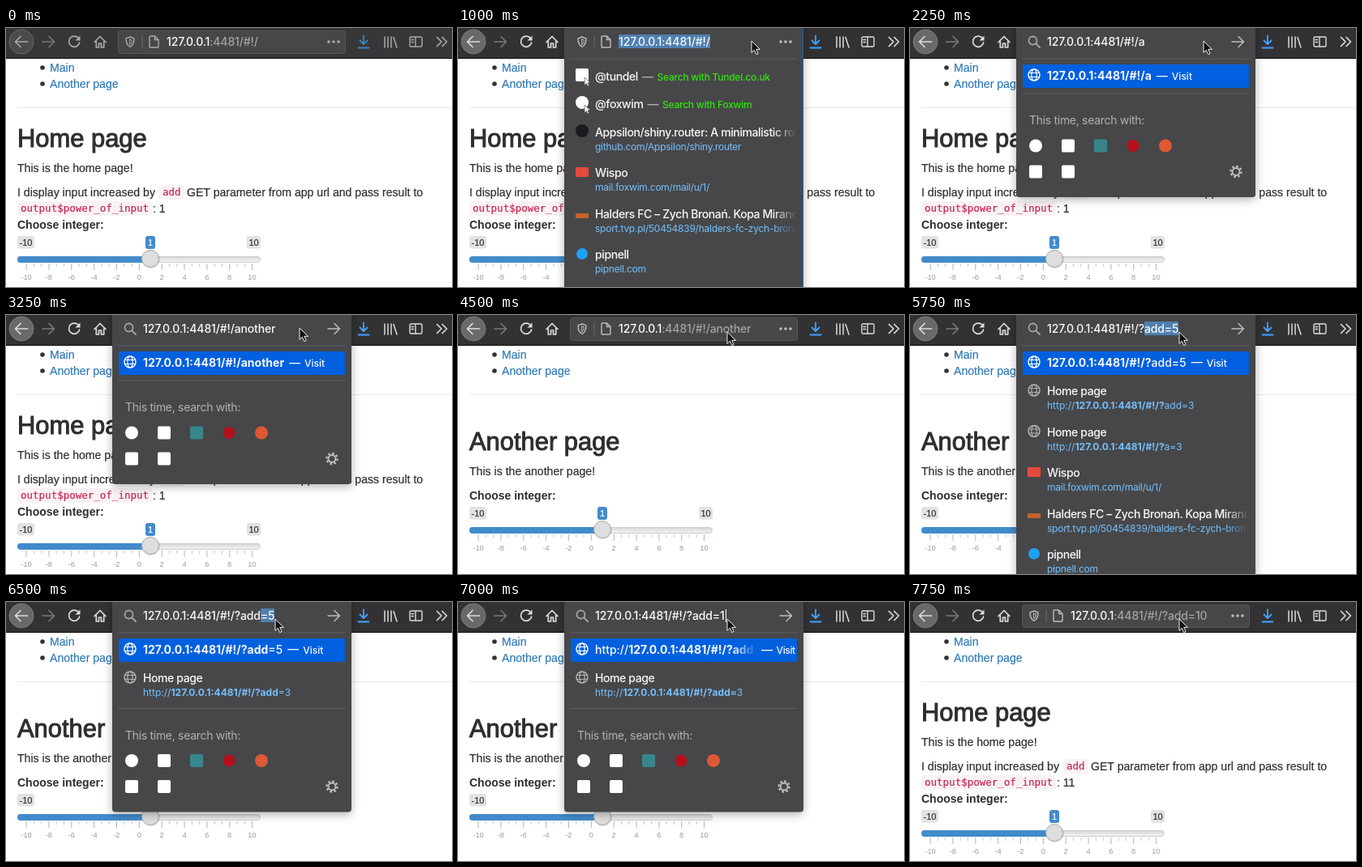
Write an HTML page that moves like this. It is 550 px wide and 320 px high and loops after 8 s.

```html
<!DOCTYPE html>
<html lang="en">
<head>
<meta charset="utf-8">
<title>Router demo</title>
<style>
html, body { margin: 0; width: 100%; height: 100%; overflow: hidden; background: #fff; }
#stage { position: relative; width: 550px; height: 320px; overflow: hidden; }
svg { position: absolute; left: 0; top: 0; }
text { white-space: pre; }
.page text { font: 14.1px "Liberation Sans", Arial, sans-serif; fill: #2e2e2e; stroke: #2e2e2e; stroke-width: .2px; }
.page .head { font-size: 30.9px; stroke-width: 1px; }
.page .bold { font-weight: 700; font-size: 14px; stroke: none; }
.page .link { fill: #2f78b7; stroke: #2f78b7; }
.page .code { font: 12.5px "DejaVu Sans Mono", monospace; fill: #c7254e; stroke: #c7254e; }
.page .tag { font-size: 11px; text-anchor: middle; }
.page .now { fill: #fff; stroke: #fff; }
.page .num { font-size: 9.3px; fill: #919ca5; stroke: none; text-anchor: middle; }
.ui text, #stage .url { font: 500 14px Inter, "Noto Sans", sans-serif; letter-spacing: -.4px; fill: #f9f9fa; color: #f9f9fa; }
.ui .sub { font-size: 12px; font-weight: 400; letter-spacing: -.25px; fill: #74c0ff; }
.ui .act { font-size: 12px; letter-spacing: -.25px; fill: #30e60b; }
.ui .addr { letter-spacing: 0; }
.ui .hit { font-weight: 700; }
.ui .dash { fill: #b1b1b3; }
.ui .visit { font-size: 12px; }
.ui .hint { fill: #b1b1b3; font-weight: 400; letter-spacing: -.3px; }
#stage .url { position: absolute; top: 6.9px; line-height: 20px; white-space: pre; letter-spacing: -.15px; }
.url .dim { color: #a3a3a6; }
.url .sel { background: #4f80b0; }
.url .caret { display: inline-block; width: 1px; height: 16px; margin-left: 1px; background: #fff; vertical-align: -3px; }
</style>
</head>
<body>
<div id="stage"></div>
<script>
const STEP = 250, LOOP = 8000;
const HOST = '127.0.0.1', BASE = HOST + ':4481/#!/';

// Each entry holds from its time on; later entries inherit earlier values.
const script = [
  [0,    { page: 'home', out: 1, path: '', active: false, menu: '', mouse: null, sel: '', caret: false }],
  [250,  { mouse: [455, 120] }],
  [500,  { mouse: [386, 46] }],
  [750,  { mouse: [362, 16], active: true }],
  [1000, { menu: 'top', sel: BASE }],
  [1500, { sel: '' }],
  [2250, { menu: 'visit', path: 'a' }],
  [2500, { path: 'ano' }],
  [2750, { path: 'anot' }],
  [3000, { path: 'anothe' }],
  [3250, { path: 'another' }],
  [3500, { menu: '', page: 'another' }],
  [4000, { mouse: [353, 18] }],
  [4250, { mouse: [339, 21] }],
  [4500, { mouse: [332, 21] }],
  [4750, { menu: 'top', sel: 'another' }],
  [5750, { menu: 'mixed', path: '?add=5', sel: 'add=5' }],
  [6000, { menu: 'two', sel: 'dd=5' }],
  [6250, { menu: 'one', sel: 'd=5' }],
  [6500, { sel: '=5' }],
  [6750, { sel: '5' }],
  [7000, { path: '?add=1', sel: '', caret: true }],
  [7250, { path: '?add=10' }],
  [7500, { menu: '', page: 'home', out: 11, caret: false }]
];

const text = (x, y, s, cls = '') => `<text x="${x}" y="${y}" class="${cls}">${s}</text>`;
const span = (s, cls, dx = 0) => `<tspan class="${cls}" dx="${dx}">${s}</tspan>`;
const rect = (x, y, w, h, fill, r = 0, more = '') =>
  `<rect x="${x}" y="${y}" width="${w}" height="${h}" rx="${r}" fill="${fill}" ${more}/>`;
const disc = (x, y, r, fill, more = '') => `<circle cx="${x}" cy="${y}" r="${r}" fill="${fill}" ${more}/>`;
const line = (d, color, w = 1.5) =>
  `<path d="${d}" fill="none" stroke="${color}" stroke-width="${w}" stroke-linecap="round" stroke-linejoin="round"/>`;

const defs = `<defs>
  <linearGradient id="g1" gradientUnits="userSpaceOnUse" x1="388" x2="418"><stop stop-color="#fff"/><stop offset="1"/></linearGradient>
  <linearGradient id="g2" gradientUnits="userSpaceOnUse" x1="338" x2="369"><stop stop-color="#fff"/><stop offset="1"/></linearGradient>
  <linearGradient id="track" x2="0" y2="1"><stop stop-color="#d6d6d6"/><stop offset="1" stop-color="#f4f4f4"/></linearGradient>
  <mask id="fade" maskUnits="userSpaceOnUse" x="0" y="0" width="418" height="320"><rect width="418" height="320" fill="url(#g1)"/></mask>
  <mask id="cut" maskUnits="userSpaceOnUse" x="0" y="0" width="369" height="320"><rect width="369" height="320" fill="url(#g2)"/></mask>
  <filter id="shadow" x="-20%" y="-20%" width="140%" height="140%"><feDropShadow dx="0" dy="3" stdDeviation="6" flood-opacity=".3"/></filter>
</defs>`;

function slider(dy) {
  let s = rect(14, 257, 21, 15.5, '#e2e2e2', 3) + text(24.5, 268.5, '-10', 'tag')
    + rect(297, 257, 17, 15.5, '#e2e2e2', 3) + text(305.5, 268.5, '10', 'tag')
    + rect(172, 257, 12, 16, '#428bca', 3) + text(178, 269, '1', 'tag now')
    + rect(14.5, 282.5, 299, 7, 'url(#track)', 3.5, 'stroke="#ccc"')
    + rect(14, 282, 164, 8, '#428bca', 4);
  for (let i = 0; i <= 30; i++) {
    const big = i % 3 === 0;
    s += rect(24.6 + i * 9.283, 291, 1, big ? 8 : 4, big ? '#a3b9cd' : '#bccbd9');
  }
  for (let i = 0; i <= 10; i++) s += text((25 + i * 27.85).toFixed(1), 311, i * 2 - 10, 'num');
  s += disc(178.7, 286, 11, 'rgba(0,0,0,.12)') + disc(178, 285, 10.5, '#dedede', 'stroke="#ababab"');
  return `<g transform="translate(0 ${dy})">${s}</g>`;
}

function page({ page, out }) {
  let s = disc(45, 49, 2.8, '#333') + disc(45, 69, 2.8, '#333')
    + text(54, 53.5, 'Main', 'link') + text(54, 73.5, 'Another page', 'link')
    + rect(14, 98, 536, 1, '#e9e9e9');
  if (page === 'home') {
    s += text(14, 147, 'Home page', 'head') + text(14, 177.5, 'This is the home page!')
      + text(14, 207.5, 'I display input increased by')
      + rect(189, 194, 31, 18, '#f9f2f4', 4) + text(193, 207, 'add', 'code')
      + text(223, 207.5, 'GET parameter from app url and pass result to')
      + rect(14, 214, 166, 18, '#f9f2f4', 4) + text(18, 227, 'output$power_of_input', 'code')
      + text(181, 227.5, ': ' + out) + text(14, 247.5, 'Choose integer:', 'bold') + slider(0);
  } else {
    s += text(14, 167, 'Another page', 'head') + text(14, 197.5, 'This is the another page!')
      + text(14, 227.5, 'Choose integer:', 'bold') + slider(-20);
  }
  return `<g class="page">${s}</g>`;
}

const dots = c => [398, 404, 410].map(x => disc(x, 17, 1.8, c)).join('');

function siteIcons(c) {
  return line('M153 11l5 1.800c0 5.500-1.300 8.700-5 10.700c-3.700-2-5-5.200-5-10.700z', c, 1.4)
    + line('M153 14l2.300 .8c0 2.700-.7 4.500-2.300 5.700z', c, 1)
    + rect(167.5, 9, 1, 16, '#6a6a6d')
    + line('M177 11q0-1 1-1h5.500l4.500 4.500v8.500q0 1-1 1h-9q-1 0-1-1zM183.500 10v4.500h4.500', c, 1.4)
    + dots(c);
}

function toolbar(active) {
  const c = active ? '#dcdcde' : '#a9a9ac';
  return rect(0, 0, 550, 38, active ? '#323234' : '#373739') + rect(0, 37, 550, 1, '#0c0c0d')
    + disc(19, 17, 15, active ? '#69696c' : '#4b4b4e', `stroke="${active ? '#7c7c7f' : '#6a6a6d'}"`)
    + line('M26.500 17H12M18 10.500l-6.500 6.500 6.500 6.500', c, 1.7)
    + line('M45 17h14.500M53 10.500l6.500 6.500-6.500 6.500', '#79797c', 1.7)
    + line('M89.800 13.300A6.600 6.600 0 1 0 90.600 18', c, 1.7) + `<path d="M91.500 9.500v6h-6z" fill="${c}"/>`
    + line('M109 17.500L116 10.500l7 7M111.300 16.500v7.500h3.200v-5h3v5h3.200v-7.500', c, 1.7)
    + rect(138.5, 3.5, 280, 28, '#474749', 3, 'stroke="#56565a"')
    + siteIcons(active ? '#bdbdc0' : '#a9a9ac')
    + line('M441 9.500v10M436.500 15.500l4.500 4.500 4.500-4.500M434.500 24.500h13', active ? '#45a1ff' : '#3f83bd', 1.8)
    + line('M467 11v13M471 11v13M475 11v13M478 11.500l4 12.500', c)
    + line('M499.500 11h12q1.500 0 1.500 1.500v9q0 1.500-1.500 1.500h-12q-1.500 0-1.500-1.500v-9q0-1.500 1.500-1.500zM505 11v12M500 14.500h2.500M500 17.500h2.500', c, 1.4)
    + line('M531.500 11.500l5.500 5.500-5.500 5.500M538 11.500l5.500 5.500-5.500 5.500', c, 1.7);
}

const globe = (y, c) => disc(153, y, 7, 'none', `stroke="${c}" stroke-width="1.500"`)
  + `<ellipse cx="153" cy="${y}" rx="3.200" ry="7" fill="none" stroke="${c}" stroke-width="1.200"/>`
  + line(`M146.500 ${y - 2.5}h13M146.500 ${y + 2.5}h13`, c, 1.2);
const square = (x, y, c) => rect(x - 8, y - 8, 16, 16, c, 2);

// Two-line result; y is the baseline of its title.
const result = (y, icon, title, url, cls = 'sub') =>
  icon + `<g mask="url(#fade)">${text(169, y, title)}${text(169, y + 17.3, url, cls)}</g>`;

const alias = (y, icon, name, engine) => icon
  + `<path d="M156 ${y + 1}l7 6.500-3 .4 1.700 3.200-1.800.9-1.600-3.200-2.300 2z" fill="#eee" stroke="#474749" stroke-width=".6"/>`
  + text(169, y + 5, name + span('—', 'dash', 5) + span('Search with ' + engine, 'act', 5));

const sites = y =>
  result(y, rect(145, y - 12, 16, 12, '#e5493c'), 'Wispo', 'mail.foxwim.com/mail/u/1/')
  + result(y + 50.5, rect(145, y + 45, 16, 6, '#c2622d'), 'Halders FC – Zych Bronań. Kopa Mirandy', 'sport.tvp.pl/50454839/halders-fc-zych-bronan')
  + result(y + 101, disc(153, y + 95, 7, '#1da1f2'), 'pipnell', 'pipnell.com');

const history = (y, typed, rest) =>
  result(y, globe(y - 6, '#b1b1b3'), 'Home page', 'http://' + span(BASE + typed, 'hit') + rest, 'sub addr');

const typedPart = ({ path, sel }) => path.slice(0, path.length - sel.length);

function visit(s) {
  const typed = BASE + typedPart(s);
  const tail = span('Visit', 'visit', 5);
  const row = rect(139, 45, 279, 29, '#0060df', 2) + globe(58, '#fff');
  if (s.path.startsWith('?') && !s.sel)
    return row + `<g mask="url(#cut)">${text(169, 64, 'http://' + span(typed, 'hit'), 'addr')}</g>` + text(374, 64, '—' + tail);
  return row + text(169, 64, span(typed, 'hit') + s.sel + span('—', '', 6) + tail, 'addr');
}

function engines(dy) {
  const gear = disc(402, 177.5, 4.5, 'none', 'stroke="#c4c4c6" stroke-width="1.800"')
    + disc(402, 177.5, 6.6, 'none', 'stroke="#c4c4c6" stroke-width="2.200" stroke-dasharray="2.600 2.584"');
  return `<g transform="translate(0 ${dy})">` + rect(138, 80.5, 281, 1, '#5e5e61')
    + text(147, 119, 'This time, search with:', 'hint')
    + disc(155, 145.5, 8, '#fff') + square(195, 145.5, '#fff') + square(235, 145.5, '#37868a')
    + disc(275, 145.5, 7.5, '#b3101c') + disc(315, 145.5, 8, '#de5833')
    + square(155, 177.5, '#fff') + square(195, 177.5, '#fff') + gear + '</g>';
}

// Splits a known path where the typed text stops matching it.
function matched(typed, full) {
  let n = 0;
  while (n < typed.length && typed[n] === full[n]) n++;
  return [full.slice(0, n), full.slice(n)];
}

function menu(s) {
  const bottom = { top: 340, mixed: 340, visit: 209, one: 259.5, two: 310 }[s.menu];
  let out = rect(131, -20, 295, bottom + 20, '#474749', 4, 'filter="url(#shadow)"')
    + rect(138, 37.5, 281, 1, '#5e5e61');
  if (s.menu === 'top') {
    out += rect(425, 0, 1, 320, '#0a66c8') + siteIcons('#bdbdc0')
      + alias(60, square(153, 58, '#fff'), '@tundel', 'Tundel.co.uk')
      + alias(94, disc(153, 92, 8, '#fff'), '@foxwim', 'Foxwim')
      + result(133.5, disc(153, 127, 8, '#191b1f'), 'Appsilon/shiny.router: A minimalistic router', 'github.com/Appsilon/shiny.router')
      + sites(184);
  } else {
    const typed = typedPart(s);
    out += disc(151.5, 15.5, 5, 'none', 'stroke="#a3a3a6" stroke-width="1.800"') + line('M155.500 19.500l4.500 4.500', '#a3a3a6', 2)
      + line('M397 17h14M405 10.500l6.500 6.500-6.500 6.500', '#bdbdc0') + visit(s);
    if (s.menu !== 'visit') out += history(99, ...matched(typed, '?add=3'));
    if (s.menu === 'mixed' || s.menu === 'two') out += history(149.5, ...matched(typed, '?a=3'));
    if (s.menu === 'mixed') out += sites(200);
    else out += engines({ visit: 0, one: 50.5, two: 101 }[s.menu]);
  }
  return out;
}

function address({ path, menu, sel, caret }) {
  const full = BASE + path;
  const x = menu && menu !== 'top' ? 169 : 198;
  const body = menu
    ? full.slice(0, full.length - sel.length) + `<span class="sel">${sel}</span>` + (caret ? '<span class="caret"></span>' : '')
    : HOST + `<span class="dim">${full.slice(HOST.length)}</span>`;
  return `<div class="url" style="left:${x}px">${body}</div>`;
}

const pointer = ([x, y]) => `<svg width="550" height="320"><path transform="translate(${x} ${y}) scale(.93)"
  d="M0 0v15.500l3.600-3.400 2.500 5.700 2.600-1.100-2.500-5.600h5z" fill="#111" stroke="#fff" stroke-width="1"/></svg>`;

const stage = document.getElementById('stage');

function draw(s) {
  stage.innerHTML = `<svg width="550" height="320">${defs}${page(s)}<g class="ui">${toolbar(s.active)}${s.menu ? menu(s) : ''}</g></svg>`
    + address(s) + (s.mouse ? pointer(s.mouse) : '');
}

let shown = -1;
function tick(now) {
  const i = Math.floor((now % LOOP) / STEP);
  if (i !== shown) {
    shown = i;
    draw(Object.assign({}, ...script.filter(e => e[0] <= i * STEP).map(e => e[1])));
  }
  requestAnimationFrame(tick);
}
tick(0);
</script>
</body>
</html>
```
